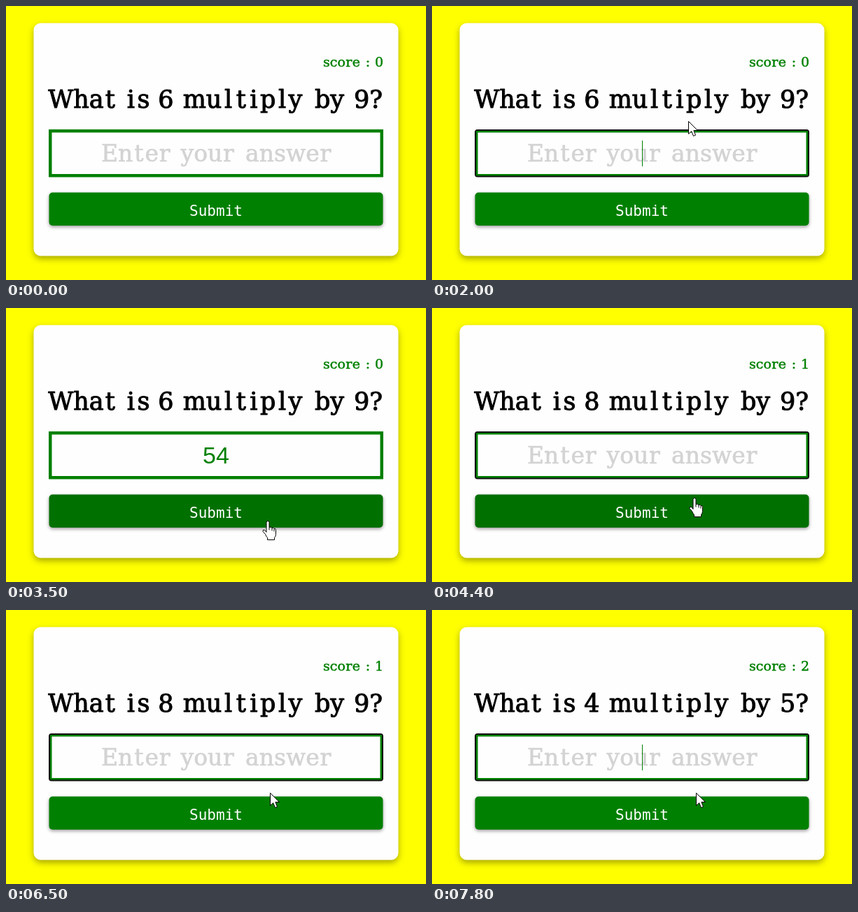
An HTML page with a canvas that plays this animation: 600 by 393 pixels, repeating every 8 s.

```html
<!DOCTYPE html>
<html lang="en">
<head>
<meta charset="utf-8">
<title>Multiplication quiz</title>
<style>
  html, body { margin: 0; width: 100%; height: 100%; overflow: hidden; background: #ff0; }
  canvas { display: block; width: 100vw; height: 100vh; }
</style>
</head>
<body>
<canvas id="stage" width="600" height="393"></canvas>
<script>
const ctx = document.getElementById('stage').getContext('2d');
const LOOP = 8000, STEP = 100;
const GREEN = '#008000', PAPER = '#fffeff';

// Each entry takes effect at its time and holds until the next one.
const rounds = [
  [0, { a: 6, b: 9, score: 0 }],
  [3900, { a: 8, b: 9, score: 1 }],
  [7600, { a: 4, b: 5, score: 2 }]
];
const typed = [[0, ''], [2300, '5'], [2500, '54'], [3900, ''], [6900, '7'], [7200, '72'], [7600, '']];
const focus = [[0, false], [900, true], [3500, false], [4000, true]];
const caret = [
  [0, false], [900, true], [1400, false], [2000, true], [3100, false],
  [4000, true], [4400, false], [4900, true], [5500, false], [6000, true],
  [6500, false], [6900, true]
];
const pointer = [
  [100, 548, 30], [300, 430, 95], [500, 270, 178], [700, 192, 206], [900, 197, 205],
  [1000, 190, 203], [1100, 232, 190], [1200, 320, 166], [1300, 363, 160], [1400, 366, 165],
  [3000, 366, 165], [3100, 367, 176], [3300, 371, 245], [3500, 374, 307], [4200, 374, 307],
  [4400, 375, 274], [4600, 377, 263], [4700, 377, 262]
];

const arrow = new Path2D('M0 0V18L4.2 14.2L7 21L10 19.7L7.4 13H13Z');
const hand = new Path2D('M-2.5 0Q-2.5 -2 -.5 -2T1.5 0V7Q4 6 5.5 8Q7.5 7 8.5 9' +
  'Q11 8.3 11 11V17Q11 20 9 22V25H-1V22Q-3 20 -4 17L-7.5 13Q-8 10 -5 11L-2.5 14Z');
const handFolds = new Path2D('M1.5 7V11M5.5 8V12M8.5 9V13');
const beam = new Path2D('M-3.5 -8.5H-1L0 -7.5L1 -8.5H3.5M0 -7.5V7.5M-3.5 8.5H-1L0 7.5L1 8.5H3.5');

function at(track, t) {
  let value = track[0][1];
  for (const [time, v] of track) if (time <= t) value = v;
  return value;
}

function pointerAt(t) {
  if (t < pointer[0][0]) return null;
  const i = pointer.findIndex(p => p[0] > t);
  if (i < 0) return pointer[pointer.length - 1].slice(1);
  const [t0, x0, y0] = pointer[i - 1], [t1, x1, y1] = pointer[i];
  const k = (t - t0) / (t1 - t0);
  return [Math.round(x0 + (x1 - x0) * k), Math.round(y0 + (y1 - y0) * k)];
}

function box(x, y, w, h, r, color, drop = 0, blur = 0, alpha = 0) {
  ctx.save();
  ctx.shadowColor = `rgba(0,0,0,${alpha})`;
  ctx.shadowOffsetY = drop;
  ctx.shadowBlur = blur;
  ctx.fillStyle = color;
  ctx.beginPath();
  ctx.roundRect(x, y, w, h, r);
  ctx.fill();
  ctx.restore();
}

function label(text, y, font, color) {
  ctx.font = font;
  ctx.fillStyle = color;
  ctx.textAlign = 'center';
  ctx.fillText(text, 300, y);
}

// Slab lettering: narrow letters get the roomy advance of a typewriter face.
function slab(list, y, size, weight, color) {
  ctx.font = `${size}px "DejaVu Serif", serif`;
  ctx.fillStyle = ctx.strokeStyle = color;
  ctx.lineWidth = weight;
  ctx.lineJoin = 'round';
  ctx.textAlign = 'center';
  for (const [text, center] of list) {
    const chars = [...String(text)];
    const widths = chars.map(c => Math.max(ctx.measureText(c).width, size * 0.52));
    let x = center - widths.reduce((sum, w) => sum + w, 0) / 2;
    chars.forEach((c, i) => {
      ctx.fillText(c, x + widths[i] / 2, y);
      ctx.strokeText(c, x + widths[i] / 2, y);
      x += widths[i];
    });
  }
}

function drawInput(t) {
  const value = at(typed, t);
  if (at(focus, t)) {
    box(61, 177, 478, 68.5, 4, '#101010');
    box(63, 179, 474, 64.5, 1, GREEN);
  } else {
    box(61, 177, 478, 68.5, 0, GREEN);
  }
  box(65.5, 181.5, 469, 59.5, 0, PAPER);
  if (value) label(value, 223, '34px "Liberation Sans", Arial, sans-serif', GREEN);
  else slab([['Enter', 185.5], ['your', 288], ['answer', 403.5]], 223, 33, 0.7, '#d3d3d3');
  if (at(caret, t)) {
    const x = 300 + (value ? Math.round(ctx.measureText(value).width / 2) : 0);
    ctx.fillStyle = GREEN;
    ctx.fillRect(x, 193, 1, 37);
  }
}

function drawPointer([x, y], overButton) {
  ctx.save();
  ctx.translate(x + 0.5, y + 0.5);
  ctx.lineWidth = 1;
  ctx.strokeStyle = '#000';
  ctx.fillStyle = '#fff';
  if (y > 177 && y < 246) ctx.stroke(beam);
  else {
    const shape = overButton ? hand : arrow;
    ctx.fill(shape);
    ctx.stroke(shape);
    if (overButton) ctx.stroke(handFolds);
  }
  ctx.restore();
}

function draw(t) {
  const { a, b, score } = at(rounds, t);
  const pos = pointerAt(t);
  const hover = !!pos && pos[1] >= 267 && pos[1] < 315 && pos[0] > 61 && pos[0] < 539;

  ctx.fillStyle = '#ff0';
  ctx.fillRect(0, 0, 600, 393);
  box(39.5, 24.5, 521, 334, 10, PAPER, 4, 10, 0.35);
  slab([['score', 479.5], [':', 517], [score, 533]], 87, 19, 0.5, GREEN);
  slab([
    ['What', 109], ['is', 187.5], [a, 228.5], ['multiply', 338], ['by', 462], [b + '?', 517.5]
  ], 146, 35, 1, '#000');
  drawInput(t);
  box(61.5, 267.5, 477, 47.5, 5, hover ? '#007000' : GREEN, 2, 5, 0.4);
  label('Submit', 300.5, '21px "DejaVu Sans Mono", monospace', '#fff');
  if (pos) drawPointer(pos, hover);
}

const start = performance.now();
function tick() {
  const t = (performance.now() - start) % LOOP;
  draw(Math.floor(t / STEP) * STEP);
  requestAnimationFrame(tick);
}
tick();
</script>
</body>
</html>
```
